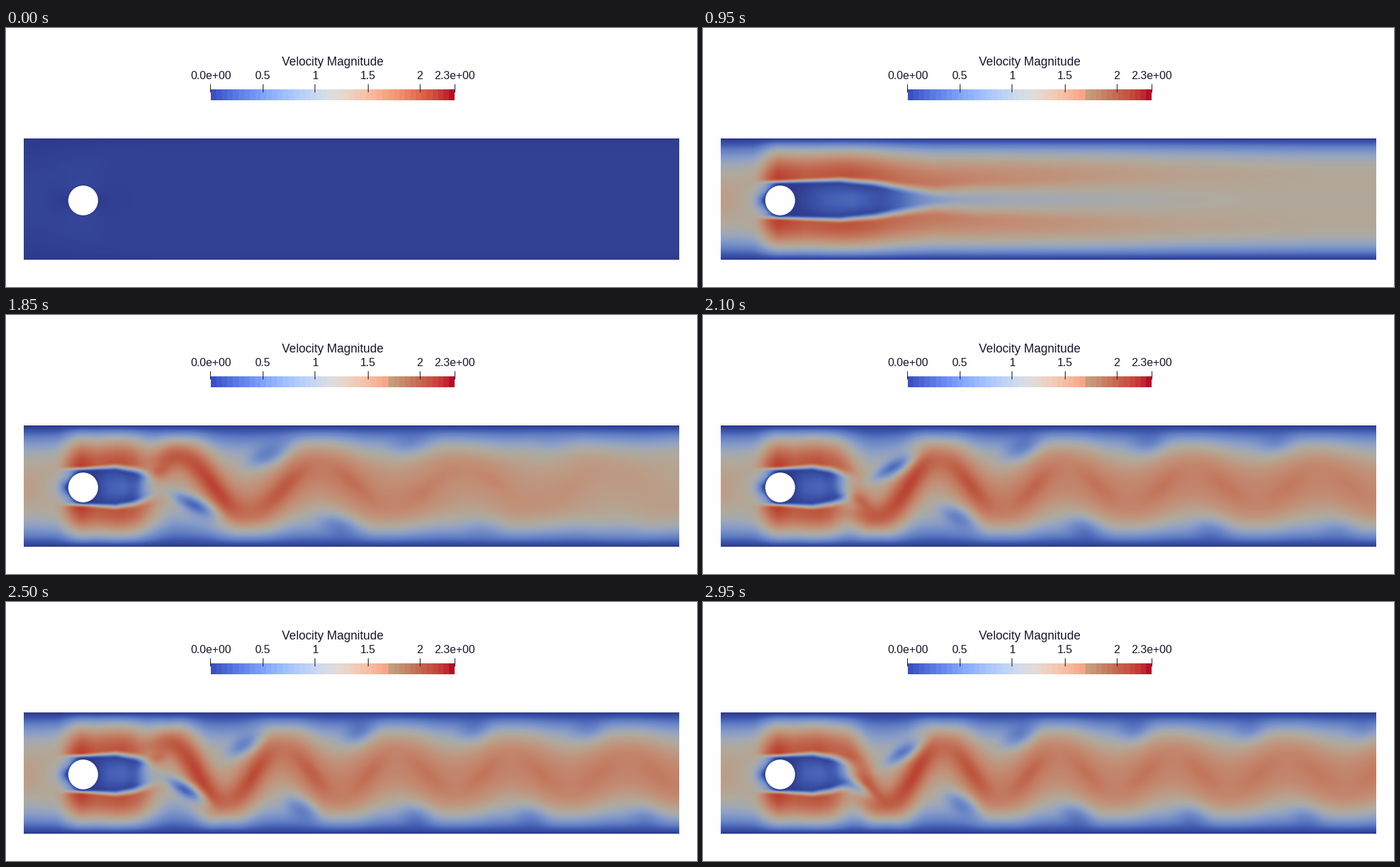
A matplotlib script for the animation above (3000 ms loop, 1012 by 380 pixels).

```python
import numpy as np
import matplotlib.pyplot as plt
from matplotlib.animation import FuncAnimation
from matplotlib.colors import LinearSegmentedColormap
from matplotlib.patches import Circle

W, H, DPI = 1012, 380, 64
PX = 72 / DPI
LEFT, RIGHT, TOP, BOTTOM = 26, 986, 162, 340
CX, CY, R = 113, 253, 21.8
MID = 251.5
VMAX = 2.33
FRAMES, STEP = 60, 50
INK = "#15152b"

STOPS = [
    (0.0, (46, 58, 140)), (0.08, (52, 68, 150)), (0.25, (62, 88, 175)),
    (0.5, (98, 127, 196)), (0.8, (135, 156, 200)), (1.0, (160, 168, 182)),
    (1.2, (176, 170, 158)), (1.4, (187, 158, 137)), (1.6, (195, 140, 115)),
    (1.8, (194, 118, 92)), (2.0, (190, 92, 68)), (2.15, (188, 66, 52)),
    (VMAX, (186, 40, 44)),
]
flow_map = LinearSegmentedColormap.from_list(
    "flow", [(v / VMAX, tuple(c / 255 for c in rgb)) for v, rgb in STOPS], N=512)

x = np.linspace(LEFT + 1, RIGHT - 1, 480)
y = np.linspace(TOP + 0.5, BOTTOM - 0.5, 119)
X, Y = np.meshgrid(x, y)
wall = np.minimum(Y - TOP, BOTTOM - Y)


def smooth(v, a, b):
    t = np.clip((v - a) / (b - a), 0, 1)
    return t * t * (3 - 2 * t)


def gap_to_wall(yc):
    return np.where(Y < yc, yc - TOP, BOTTOM - yc)


def approach(n):
    """Channel profile bent around the cylinder."""
    p_far = 3.2 + 14 * np.exp(-n / 3)
    p = 2 + (p_far - 2) * smooth(x, LEFT, LEFT + 250)
    eta = np.clip(np.abs(Y - MID) / (BOTTOM - MID), 0, 1)
    profile = (p + 1) / p * (1 - eta ** p)
    z = (X - CX) + 1j * (Y - CY)
    z = np.where(np.abs(z) < R, R, z)
    return profile * np.abs(1 - R * R / z ** 2)


def wake(n, grow, yc):
    """Slow wake between two fast bands, stretched downstream by grow."""
    xi = np.where(x > CX, CX + (x - CX) / grow, x)
    half = np.interp(xi, [113, 200, 250, 300, 340], [22, 23, 17, 7, 0])
    edge = np.interp(xi, [113, 200, 300, 400, 600], [9, 13, 20, 30, 36])
    core = np.interp(xi, [113, 140, 180, 220, 260, 290, 320, 370, 450, 650, 800],
                     [0, .05, .3, .35, .2, .35, .65, .92, 1, 1.13, 1.22])
    peak = np.interp(xi, [113, 150, 220, 290, 400, 500, 700, 900],
                     [2.15, 2, 2.05, 1.85, 1.65, 1.55, 1.35, 1.25])
    peak = np.maximum(peak, 1.22 + .95 * np.exp(-((x - 108) / 32) ** 2))
    d = np.abs(Y - yc)
    hollow = np.clip(d / np.maximum(half, 1), 0, 1) ** 2
    core = core * (1 - .7 * hollow * (1 - smooth(xi, 230, 290)))
    inner = core + (peak - core) * smooth(d, half, half + edge)
    band = half + edge
    s = np.clip((d - band) / (gap_to_wall(yc) - band), 0, 1)
    return inner * (1 - s ** (1.9 + 12 * np.exp(-n / 4)))


def wave(n):
    """Wavelength and phase of the travelling vortex street."""
    length = 168 + 42 * smooth(46 - n, 0, 9)
    cycles = .298 * (n - 46) + .3 * max(0, 37 - n) / 8
    return length, 2 * np.pi * ((x - 290) / length - cycles)


def street(length, theta):
    """Meandering jet with slow lobes on alternate sides."""
    swing = np.interp(x, [200, 300, 350, 450, 600, 900], [45, 42, 36, 28, 20, 16])
    yj = MID + swing * np.cos(theta)
    slope = swing * 2 * np.pi / length * np.sin(theta)
    dn = np.abs(Y - yj) / np.sqrt(1 + slope ** 2)

    yb = MID + .6 * swing * np.cos(theta)
    s = np.clip(np.abs(Y - yb) / gap_to_wall(yb), 0, 1)
    base = np.interp(x, [250, 500], [1.4, 1.62]) * (1 - s ** 2.2)

    fast = np.interp(x, [200, 280, 330, 430, 550, 900], [2.05, 2, 1.9, 1.78, 1.68, 1.68])
    width = np.interp(x, [200, 500], [21, 30])
    u = base + (fast - base) * np.exp(-(dn / width) ** 2) * np.tanh(wall / 14)
    glow = np.interp(x, [260, 330, 600, 950], [.1, .25, .14, .08])
    u += glow * np.sin(theta) ** 2 * np.exp(-(dn / 13) ** 2)

    off = np.interp(x, [230, 320, 405, 492, 600], [18, 38, 50, 60, 66])
    depth = np.interp(x, [200, 260, 320, 400, 500, 650, 950],
                      [.88, .78, .55, .5, .45, .36, .25])
    tilt = np.interp(x, [220, 340, 600], [1.3, .7, .2])
    tall = np.interp(x, [220, 400], [14, 19])
    lean = tilt * (np.abs(Y - MID) - off)
    lobe_phase = theta - 2 * np.pi * (27 + lean) / length
    for side in (1, -1):
        pulse = np.clip(side * np.cos(lobe_phase), 0, 1) ** 2.5
        u *= 1 - depth * pulse * np.exp(-((Y - MID + side * off) / tall) ** 2)
    return u


def speed(n):
    start = 24 + np.clip(x - 300, 0, None) / 80
    grown = smooth(n, start, start + 12)
    length, theta = wave(n)

    sway = 18 * smooth(x, 230, 380) * np.sqrt(grown)
    yc = 252 - sway * np.cos(theta - 2 * np.pi * 27 / length)
    u = wake(n, np.clip(n / 19, .02, 1), yc)
    if grown.max() > 0:
        near = wake(n, .55, np.full_like(x, 252))
        mix = smooth(x, 180, 250)
        u = (1 - grown) * u + grown * ((1 - mix) * near + mix * street(length, theta))

    behind = smooth(x, 70, 114) * min(1, n / 6)
    u = (1 - behind) * approach(n) + behind * u
    r = np.hypot(X - CX, Y - CY)
    skin = .15 + .85 * smooth(r, R - 2, R + 6)
    return u * skin * min(1, .06 + .47 * n)


def bar_colours(muted):
    v = (np.arange(44) + .5) / 44
    rgb = plt.get_cmap("coolwarm")(v)[:, :3]
    if muted:
        high = v * VMAX > 1.71
        rgb[high, 0] = np.minimum(rgb[high, 0], .78)
    return rgb[None]


fig = plt.figure(figsize=(W / DPI, H / DPI), dpi=DPI, facecolor="#fefefe")
ax = fig.add_axes([0, 0, 1, 1])

field = ax.imshow(speed(0), cmap=flow_map, vmin=0, vmax=VMAX, aspect="auto",
                  extent=(LEFT, RIGHT, BOTTOM, TOP), interpolation="bilinear")
bars = [bar_colours(False), bar_colours(True)]
bar = ax.imshow(bars[0], aspect="auto", extent=(300, 657, 106, 90),
                interpolation="nearest")
ax.add_patch(Circle((CX, CY), R, fc="#fefefe", ec="none", zorder=3))


def label(px, base, text, size):
    ax.text(px, base, text, fontsize=size * PX, family="Liberation Sans",
            color=INK, ha="center", va="baseline")


label(478.5, 55, "Velocity Magnitude", 17.8)
for px, text in [(300, "0.0e+00"), (376, "0.5"), (453, "1"), (530, "1.5"),
                 (606, "2"), (657, "2.3e+00")]:
    label(px, 75, text, 16.4)
    tick = px - .5 if px in (300, 453) else px + .5
    ax.plot([tick, tick], [82, 94], color=INK, lw=PX, solid_capstyle="butt")

ax.set_xlim(0, W)
ax.set_ylim(H, 0)
ax.axis("off")


def draw(n):
    field.set_data(speed(n))
    bar.set_data(bars[n > 0])
    return field, bar


anim = FuncAnimation(fig, draw, frames=FRAMES, interval=STEP, repeat=True,
                     repeat_delay=0, blit=False)
plt.show()
```
